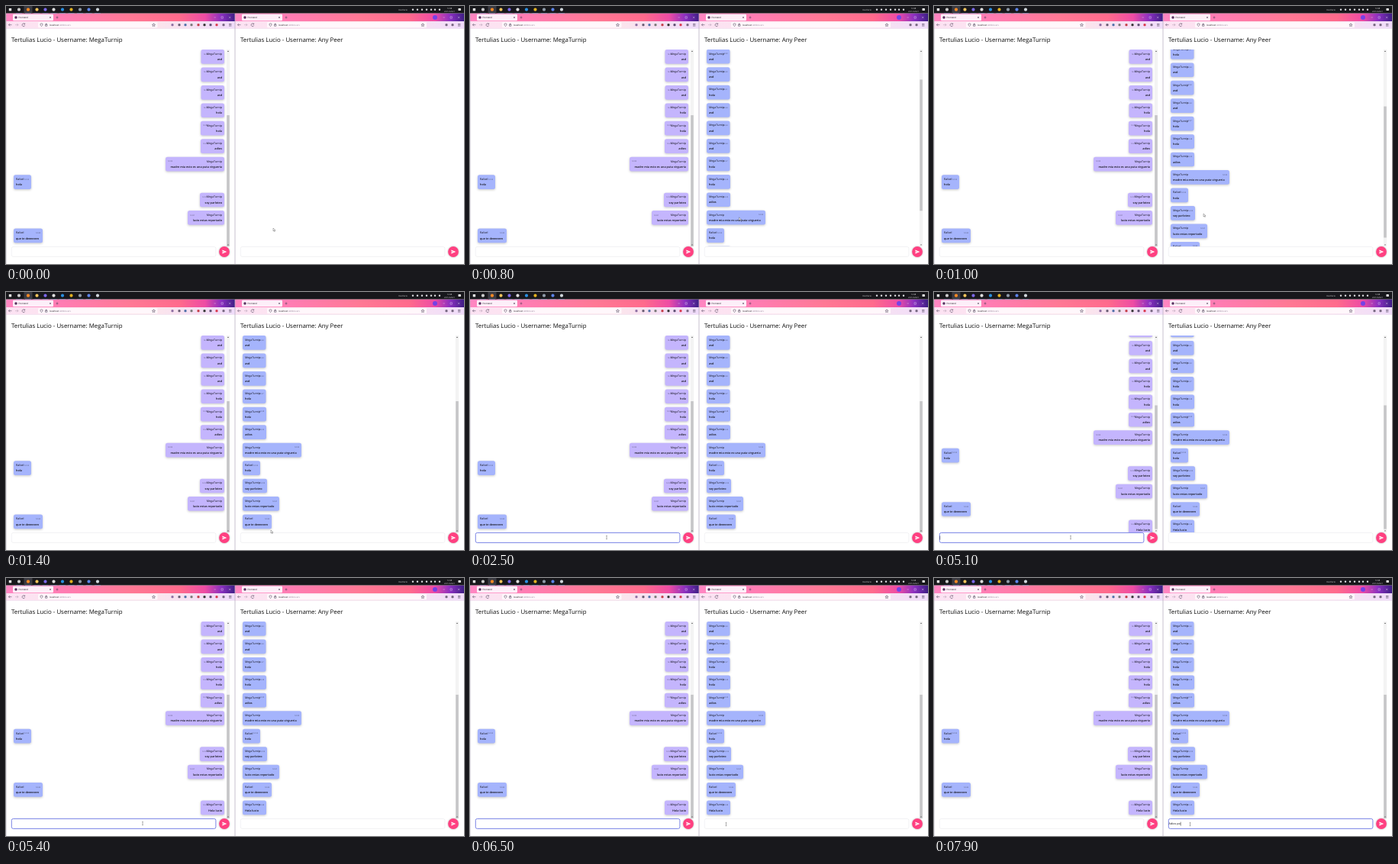
Write an HTML page that moves like this. It is 600 px wide and 338 px high and loops after 8000 ms.

```html
<!DOCTYPE html>
<html lang="es">
<head>
<meta charset="utf-8">
<title>Chat</title>
<style>
  html, body { margin: 0; width: 100%; height: 100%; overflow: hidden; background: #fff; }
  svg { display: block; width: 100vw; height: 100vh; }
  text { font: 3.75px "Open Sans", "Noto Sans", sans-serif; fill: #15151c; white-space: pre; text-rendering: geometricPrecision; }
  .heading { font-size: 7.9px; fill: #0c0c0c; }
  .name { font-size: 3.65px; }
  .body { font-weight: 600; }
  .time { font-size: 2.4px; opacity: .65; }
  .tiny { font-size: 2.9px; }
  .clock { font-size: 2.6px; fill: #eee; }
  .end { text-anchor: end; }
  .mid { text-anchor: middle; }
  .bubble { filter: drop-shadow(0 1.8px 1.6px rgba(0, 0, 0, .22)); }
  .send { filter: drop-shadow(0 .8px .8px rgba(0, 0, 0, .3)); }
  .line { fill: none; stroke: #4b4059; stroke-width: .55; }
</style>
</head>
<body>
<svg id="stage" viewBox="0 0 600 338" preserveAspectRatio="none"></svg>
<script>
const LOOP = 8000, ROW = 23.45, VIEW_TOP = 57, VIEW_H = 258;
const ME = 'MegaTurnip', FRIEND = 'Rafael';
const stage = document.getElementById('stage');

// author, text, time, bubble width
const messages = [
  [FRIEND, 'hola', '12:19', 23],
  [ME, 'hola', '12:19', 30.5],
  [ME, 'asd', '12:20', 30.5],
  [ME, 'asd', '12:20', 30.5],
  [ME, 'hola', '12:21', 30.5],
  [ME, 'asd', '12:24', 30.5],
  [ME, 'asd', '12:24', 30.5],
  [ME, 'asd', '12:24', 30.5],
  [ME, 'hola', '12:27', 30.5],
  [ME, 'hola', '12:28', 31],
  [ME, 'adios', '12:29', 31],
  [ME, 'madre mia esto es una puta virgueria', '12:33', 77],
  [FRIEND, 'hola', '12:35', 23],
  [ME, 'soy parloteo', '12:39', 32],
  [ME, 'lucio estas reportado', '12:41', 48],
  [FRIEND, 'que te deeeeeen', '12:45', 38],
  [ME, 'Hola lucio', '12:48', 31]
];
const OLD_COUNT = messages.length - 1;

const rect = (x, y, w, h, fill, r = 0, more = '') =>
  `<rect x="${x}" y="${y}" width="${w}" height="${h}" rx="${r}" fill="${fill}" ${more}/>`;
const circle = (x, y, r, fill) => `<circle cx="${x}" cy="${y}" r="${r}" fill="${fill}"/>`;
const text = (x, y, s, cls) => `<text x="${x}" y="${y}" class="${cls}">${s}</text>`;
const line = (d, more = '') => `<path class="line" d="${d}" ${more}/>`;

function bubble([author, body, time, w], i, mine) {
  const x = mine ? 286 - w : 10, y = 12 + i * ROW;
  const left = x + 3, right = x + w - 3;
  return `<g data-row="${i}">` +
    rect(x, y, w, 18.7, mine ? '#c4b5fd' : '#a5b4fc', 2.5, 'class="bubble"') +
    text(mine ? right : left, y + 6.8, author, mine ? 'name end' : 'name') +
    text(mine ? left : right, y + 6.6, time, mine ? 'time' : 'time end') +
    text(mine ? right : left, y + 14.1, body, mine ? 'body end' : 'body') + '</g>';
}

function browserChrome(isPrivate) {
  const starX = isPrivate ? 246 : 193.5;
  const dots = isPrivate
    ? [[277, '#75667f'], [285, '#75667f']]
    : [[218, '#8b6ca0'], [227, '#665a70'], [235, '#4d6ea8'], [243, '#777'], [252, '#c43b46'],
       [260, '#333'], [268, '#5b4b70'], [276, '#d9364c'], [285, '#75667f']];
  return rect(0, 9.5, 300, 11, 'url(#strip)') +
    rect(9, 10.8, 53, 8.4, '#fdeff9', 1.2) +
    circle(13, 15, 1.7, '#56305f') +
    text(16.5, 16, 'Frontend', 'tiny') +
    line('M57 14l2 2m0-2l-2 2M65.5 15h3m-1.5-1.5v3') +
    (isPrivate ? circle(262, 15, 3, '#7542e5') : '') +
    line('M272.5 15h2.4M282 13.8h2.4v2.4h-2.4zM292 13.8l2.4 2.4m0-2.4l-2.4 2.4', 'style="stroke:#fff" opacity=".6"') +
    rect(0, 20, 300, 9.5, 'url(#toolbar)') +
    rect(42, 21.2, starX - 37, 7, '#fff7fb', 1.2) +
    line('M7.5 24.7h-4m1.6-1.6l-1.6 1.6l1.6 1.6') +
    line('M12 24.7h4m-1.6-1.6l1.6 1.6l-1.6 1.6', 'opacity=".4"') +
    line('M24.5 23.6a1.9 1.9 0 1 0 .3 1.8M24.7 22.5v1.4h-1.4') +
    line('M46.5 22.9l1.6.6q0 2.3-1.6 3.2q-1.6-.9-1.6-3.2zM51.5 24.3h2.4v2h-2.4zM52 24.3v-1h1.4v1') +
    text(57, 25.8, 'localhost<tspan fill="#95869d">:4200/users</tspan>', 'tiny') +
    line(`M${starX} 22.8l.6 1.3 1.4.1-1 1 .3 1.4-1.3-.7-1.3.7.3-1.4-1-1 1.4-.1z`) +
    dots.map(([x, c]) => rect(x - 1.5, 23.2, 3, 3, c, .8)).join('') +
    line('M292 23.5h3.4m-3.4 1.3h3.4m-3.4 1.3h3.4') +
    rect(0, 29.3, 300, .4, '#e2d2e6');
}

function panel(id, x, user, isMine) {
  return `<g id="${id}" transform="translate(${x})">` +
    browserChrome(id === 'right') +
    text(7, 47, `Tertulias Lucio - Username: ${user}`, 'heading') +
    `<g clip-path="url(#view)"><g class="list">` +
    messages.map((m, i) => bubble(m, i, isMine(m[0]))).join('') + '</g></g>' +
    '<g class="bar">' + rect(288.8, VIEW_TOP, 4.4, VIEW_H, '#f3f3f3') +
    rect(289.2, 0, 3.6, 0, '#c6c6c8', 0, 'data-thumb') +
    '<path d="M289.8 60l1.2-1.4 1.2 1.4zM289.8 312.4l1.2 1.4 1.2-1.4z" fill="#666"/></g>' +
    rect(7.3, 315.4, 267.6, 13, '#fff', 2.2, 'class="input"') +
    text(7.6, 323.4, '', 'typed') +
    rect(0, 319.6, .5, 5, '#111', 0, 'data-caret') +
    `<g class="send">${circle(286, 322, 6.9, '#ff4081')}</g>` +
    '<path d="M283.4 319.5l5.8 2.5-5.8 2.5v-1.9l3.8-.6-3.8-.6z" fill="#fff"/></g>';
}

function taskbar() {
  const icons = [[17, '#ccc'], [29, '#ff8a24'], [40.5, '#f0c35b'], [51.5, '#7b68e8'], [62.5, '#ddd'],
    [74, '#2a8fe0'], [85.5, '#e0b020'], [97, '#8f9aa8'], [108.5, '#5b83e8'], [120, '#cfd6dc']];
  const tray = [533, 539, 545, 551, 557, 562, 568];
  return rect(0, 0, 600, 9.5, '#17171b') + rect(23.5, 0, 11, 9.5, '#3b3b42') +
    rect(3.8, 3, 3.4, 3.4, '#e8e8e8') +
    icons.map(([x, c]) => circle(x, 4.7, 2.1, c) + rect(x - 4, 9, 8, .5, '#7aa7d8')).join('') +
    text(514.5, 5.7, 'Escritorio', 'clock') +
    tray.map(x => circle(x, 4.7, 1.2, '#d8d8dc')).join('') +
    text(581, 4, '12:48', 'clock mid') + text(581, 7.9, '22/12/2021', 'clock mid') +
    rect(592.5, 3, 3.4, 3, '#e8e8e8', .5);
}

stage.innerHTML = `<defs>
  <linearGradient id="strip">
    <stop offset="0" stop-color="#ff86c2"/><stop offset=".25" stop-color="#ff7cb2"/>
    <stop offset=".55" stop-color="#ff7894"/><stop offset=".76" stop-color="#ff6a8c"/>
    <stop offset=".87" stop-color="#ee4ca4"/><stop offset=".94" stop-color="#8a30c0"/>
    <stop offset="1" stop-color="#3e1e84"/>
  </linearGradient>
  <linearGradient id="toolbar">
    <stop offset="0" stop-color="#fce2f3"/><stop offset=".6" stop-color="#fde6ea"/>
    <stop offset="1" stop-color="#f0dcfa"/>
  </linearGradient>
  <clipPath id="view"><rect x="0" y="${VIEW_TOP}" width="288.8" height="${VIEW_H}"/></clipPath>
  </defs>` + rect(0, 0, 600, 338, '#fff') +
  panel('left', 0, ME, a => a === ME) + panel('right', 300, 'Any Peer', () => false) +
  rect(299.6, 9.5, .8, 328.5, '#b9b2c2') + rect(0, 9.5, .4, 328.5, '#b9b2c2') + taskbar() +
  `<path id="arrow" d="M0 0v3.9l1-.9.7 1.5.7-.3-.7-1.4h1.3z" fill="#fff" stroke="#333" stroke-width=".35"/>
   <path id="beam" class="line" d="M-.7-2.2h1.4m-.7 0v4.4m-.7 0h1.4" style="stroke:#666"/>`;

const smooth = (t, a, b) => {
  const p = Math.min(1, Math.max(0, (t - a) / (b - a)));
  return p * p * (3 - 2 * p);
};
const contentHeight = count => 12 + count * ROW;
const maxScroll = count => contentHeight(count) - VIEW_H;
const show = (el, on) => el.setAttribute('visibility', on ? 'inherit' : 'hidden');

const SENT = 4700;
const typing = {
  left: { focus: [2000, 6700], word: 'Hola lucio', clear: SENT,
    keys: [3580, 3780, 3880, 3980, 4180, 4280, 4380, 4400, 4480, 4580] },
  right: { focus: [6700, LOOP], word: 'Adios po', clear: LOOP,
    keys: [7280, 7380, 7480, 7500, 7580, 7780, 7790, 7880] }
};

function bind(id) {
  const find = s => document.querySelector(`#${id} ${s}`);
  return { ...typing[id], list: find('.list'), bar: find('.bar'), thumb: find('[data-thumb]'),
    input: find('.input'), typed: find('.typed'), caret: find('[data-caret]'),
    newest: find(`[data-row="${OLD_COUNT}"]`) };
}
const left = bind('left'), right = bind('right');

function drawPanel(p, t, loaded, scroll) {
  const count = t >= SENT ? OLD_COUNT + 1 : OLD_COUNT;
  show(p.list, loaded);
  show(p.bar, loaded);
  show(p.newest, loaded && t >= SENT);
  p.list.setAttribute('transform', `translate(0 ${VIEW_TOP - scroll})`);
  const ratio = VIEW_H / contentHeight(count);
  p.thumb.setAttribute('y', VIEW_TOP + scroll * ratio);
  p.thumb.setAttribute('height', VIEW_H * ratio);

  const [from, to] = p.focus, focused = t >= from && t < to;
  p.input.setAttribute('stroke', focused ? '#6b76e2' : '#dedee4');
  p.input.setAttribute('stroke-width', focused ? .9 : .4);
  const typed = t < p.clear ? p.word.slice(0, p.keys.filter(k => k <= t).length) : '';
  p.typed.textContent = typed;
  const lastEvent = Math.max(...[from, p.clear, ...p.keys].filter(k => k <= t));
  show(p.caret, focused && (t - lastEvent) % 1000 < 500);
  p.caret.setAttribute('x', 7.6 + (typed ? p.typed.getComputedTextLength() : 0));
}

const pointerPath = [[0, 350, 291], [100, 350, 291], [200, 351, 291], [400, 351, 291], [1000, 353, 272],
  [1400, 347, 312], [1900, 179, 321.5], [5550, 179, 321.5], [5800, 270, 332], [6000, 338, 331],
  [6250, 338, 331], [6450, 335.5, 322.5], [LOOP, 335.5, 322.5]];

function drawPointer(t) {
  const next = pointerPath.findIndex(p => p[0] > t);
  const [t0, x0, y0] = pointerPath[next - 1], [t1, x1, y1] = pointerPath[next];
  const k = smooth(t, t0, t1), x = x0 + (x1 - x0) * k, y = y0 + (y1 - y0) * k;
  const overInput = y > 315.5 && y < 328.5 && x % 300 > 7 && x % 300 < 275;
  for (const [id, on] of [['arrow', !overInput], ['beam', overInput]]) {
    const el = document.getElementById(id);
    show(el, on);
    el.setAttribute('transform', `translate(${x} ${y})`);
  }
}

function render(now) {
  const t = now % LOOP;
  const base = maxScroll(OLD_COUNT), extra = ROW * smooth(t, SENT, 5330);
  drawPanel(left, t, true, base + extra);
  drawPanel(right, t, t >= 400, base * smooth(t, 485, 1155) + extra);
  drawPointer(t);
}

const start = performance.now();
function tick() {
  render(performance.now() - start);
  requestAnimationFrame(tick);
}
tick();
</script>
</body>
</html>
```
